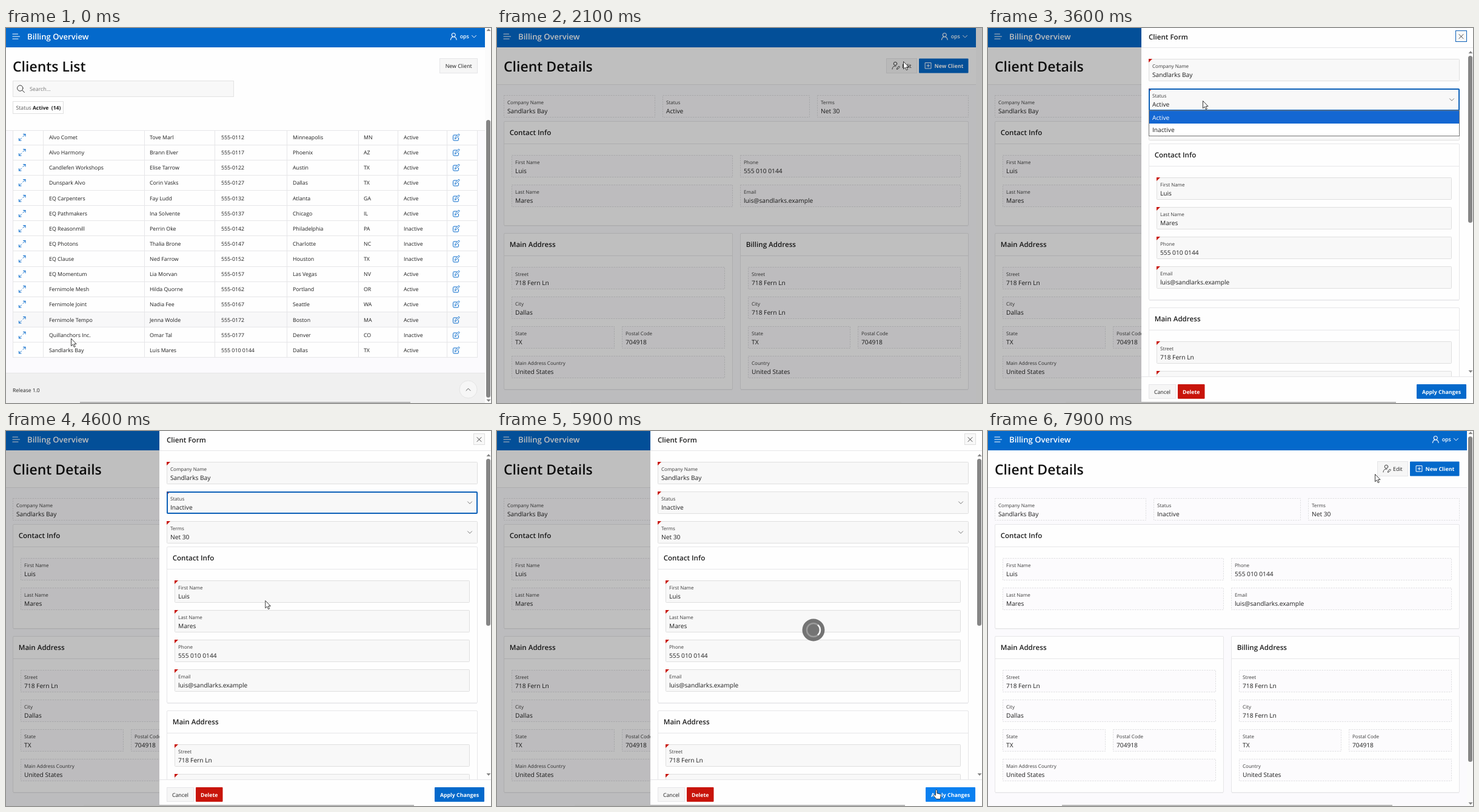
These frames come from a looping animation (800 by 620 pixels, 8 s). An HTML page:

```html
<!DOCTYPE html>
<html lang="en">
<head>
<meta charset="utf-8">
<title>Client editor</title>
<style>
html, body { margin: 0; width: 800px; height: 620px; overflow: hidden; background: #fbfafd; }
svg { display: block; font-family: "Open Sans", "Noto Sans", sans-serif; text-rendering: geometricPrecision; }
text { white-space: pre; }
.icon { fill: none; stroke-linecap: round; stroke-linejoin: round; }
</style>
</head>
<body>
<svg id="stage" width="800" height="620" viewBox="0 0 800 620"></svg>
<script>
const LOOP = 8000, STEP = 100;
const BLUE = '#0469cb', RED = '#c8140a', INK = '#1e1e1e', LINE = '#e6e6e8';

// Drawing helpers
const text = (x, y, s, size = 8.8, o = {}) =>
  `<text x="${x}" y="${y}" font-size="${size}" font-weight="${o.w || 400}" fill="${o.fill || INK}"` +
  `${o.mid ? ' text-anchor="middle"' : ''}${o.id ? ` id="${o.id}"` : ''}>${s}</text>`;
const box = (x, y, w, h, fill, extra = '') =>
  `<rect x="${x}" y="${y}" width="${w}" height="${h}" fill="${fill}" ${extra}/>`;
const frame = (x, y, x2, y2, fill, stroke = LINE, extra = '') =>
  box(x + .5, y + .5, x2 - x - 1, y2 - y - 1, fill, `stroke="${stroke}" ${extra}`);
const hline = (x, x2, y, c = LINE) => box(x, y, x2 - x, 1, c);
const vline = (x, y, y2, c = LINE) => box(x, y, 1, y2 - y, c);
const icon = (d, color, width = 1, extra = '') =>
  `<path class="icon" d="${d}" stroke="${color}" stroke-width="${width}" ${extra}/>`;
const group = (id, body, extra = '') => `<g id="${id}" ${extra}>${body}</g>`;

const firm = 'Sandlarks Bay', first = 'Luis', last = 'Mares';
const phone = '555 010 0144', mail = 'luis@sandlarks.example';
const street = '718 Fern Ln', zip = '704918';

const clients = [
  ['Alvo Comet', 'Tove Marl', 'Minneapolis', 'MN', 1],
  ['Alvo Harmony', 'Brann Elver', 'Phoenix', 'AZ', 1],
  ['Candlefen Workshops', 'Elise Tarrow', 'Austin', 'TX', 1],
  ['Dunspark Alvo', 'Corin Vasks', 'Dallas', 'TX', 1],
  ['EQ Carpenters', 'Fay Ludd', 'Atlanta', 'GA', 1],
  ['EQ Pathmakers', 'Ina Solvente', 'Chicago', 'IL', 1],
  ['EQ Reasonmill', 'Perrin Oke', 'Philadelphia', 'PA', 0],
  ['EQ Photons', 'Thalia Brone', 'Charlotte', 'NC', 0],
  ['EQ Clause', 'Ned Farrow', 'Houston', 'TX', 0],
  ['EQ Momentum', 'Lia Morvan', 'Las Vegas', 'NV', 1],
  ['Fernimole Mesh', 'Hilda Quorne', 'Portland', 'OR', 1],
  ['Fernimole Joint', 'Nadia Fee', 'Seattle', 'WA', 1],
  ['Fernimole Tempo', 'Jenna Wolde', 'Boston', 'MA', 1],
  ['Quillanchors Inc.', 'Omar Tal', 'Denver', 'CO', 0],
  [firm, `${first} ${last}`, 'Dallas', 'TX', 1]
];
const ROW_TOP = 168.4, ROW_H = 25.13;

const expandIcon = y =>
  icon(`M28 ${y - 1.5}l4-4m-3.5 0h3.5v3.500M25.500 ${y + 1}l-4 4m0-3.500v3.500h3.500`, BLUE);
const editIcon = y =>
  icon(`M743.500 ${y - 4}h-4.500q-1.500 0-1.500 1.500v6q0 1.500 1.500 1.500h6q1.500 0 1.500-1.500v-3` +
    `M740.500 ${y + 2}l.600-2.400 4.900-4.900q.900-.700 1.600 0t0 1.600l-4.900 4.900z`, BLUE);

function listPage() {
  let s = box(0, 32, 790, 138, '#fefefe') + hline(0, 790, 169) +
    text(11, 72, 'Clients List', 23, { w: 600, fill: '#111' }) +
    frame(715, 50, 778, 75, '#f6f6f6') + text(746.7, 66.2, 'New Client', 8.8, { mid: 1 }) +
    frame(11, 87, 376, 114, '#f8f8f8', '#e2e2e2') +
    icon('M28 99.500a4.700 4.700 0 1 1-9.400 0a4.700 4.700 0 1 1 9.400 0M26.700 103L30.500 106.500', '#333') +
    text(39, 104.2, 'Search...', 8.8, { fill: '#777' }) +
    frame(11, 121, 95, 142, '#fefefe', '#e0e0e0') +
    text(16.5, 135, 'Status', 8.7, { fill: '#555' }) + text(44, 135, 'Active  (14)', 8.5, { w: 700 }) +
    box(11, 170, 767, 375, '#fefefe') + box(12, 0, 765, ROW_H, '#f8f8f9', 'id="hover"');
  clients.forEach(([name, person, city, state, active], i) => {
    const y = ROW_TOP + i * ROW_H, mid = Math.round(y + 12.6), base = mid + 3.3;
    const cells = [[71, name], [237, person],
      [355, i < 14 ? '555-01' + (12 + i * 5) : phone],
      [473, city], [590, state], [656, active ? 'Active' : 'Inactive']];
    s += cells.map(([x, v]) => text(x, base, v)).join('') +
      expandIcon(mid) + editIcon(mid) + hline(11, 778, Math.round(y + ROW_H) - 1);
  });
  s += [11, 61, 228, 344, 463, 581, 646, 727, 777].map(x => vline(x, 170, 545)).join('');
  return s + box(0, 570, 790, 50, '#f0f0f0') + hline(0, 790, 570, '#e6e6e6') +
    text(11, 601.5, 'Release 1.0', 8.5) +
    '<circle cx="762.5" cy="597.5" r="14.5" fill="#f6f6f6" stroke="#e4e4e4"/>' +
    icon('M759 599.500l3.500-3.500 3.500 3.500', '#555');
}

const fieldText = (x, y, label, value, id) =>
  text(x + 6, y + 14.5, label, 8, { fill: '#3c3c3c' }) + text(x + 6, y + 29.8, value, 10.2, { id });
const readField = (x, x2, y, label, value, id) =>
  frame(x, y, x2, y + 37, '#fcfbfd', '#e0e0e2', 'stroke-dasharray="2.500 1.500"') +
  fieldText(x, y, label, value, id);
const region = (x, x2, y, y2, title) =>
  frame(x, y, x2, y2, '#fefefe', LINE, 'rx="1.500"') + hline(x, x2, y + 37) + hline(x + 1, x2 - 1, y2, '#f0f0f2') +
  text(x + 9.7, y + 23.3, title, 11.6, { w: 600 });

function addressFields(x, x2, mid, city, country) {
  return readField(x, x2, 395, 'Street', street) + readField(x, x2, 444, 'City', city) +
    readField(x, mid, 493, 'State', 'TX') + readField(mid + 12, x2, 493, 'Postal Code', zip) +
    readField(x, x2, 542, country, 'United States');
}

const detailHead = box(0, 32, 790, 61, '#fefefe') + hline(0, 790, 93) +
  text(11, 72, 'Client Details', 23, { w: 600, fill: '#111' });

const detailBody = frame(642, 50, 693, 75, '#f6f6f6') +
  icon('M659.800 59a2.800 2.800 0 1 1-5.600 0a2.800 2.800 0 1 1 5.600 0M652 68c0-4 3-5.500 6-4.800M659.500 68l.5-2 3-3 1.500 1.500-3 3z', '#444') +
  text(668, 66.2, 'Edit') +
  box(696, 50.5, 81.5, 24, BLUE, 'rx="1"') +
  icon('M706.500 57.500h9.500v9.500h-9.500zM711.250 60v4.500M709 62.250h4.500', '#fff') +
  text(721.5, 66.2, 'New Client', 8.8, { w: 700, fill: '#fff' }) +
  readField(11, 261, 111, 'Company Name', firm) +
  readField(273, 516, 111, 'Status', 'Active', 'status') +
  readField(528, 778, 111, 'Terms', 'Net 30') +
  region(11, 778, 154, 327, 'Contact Info') +
  readField(24, 389, 210, 'First Name', first) + readField(401, 765, 210, 'Phone', phone) +
  readField(24, 389, 259, 'Last Name', last) + readField(401, 765, 259, 'Email', mail) +
  region(11, 389, 339, 598, 'Main Address') +
  addressFields(24, 376, 194, 'Dallas', 'Main Address Country') +
  region(401, 778, 339, 598, 'Billing Address') +
  addressFields(414, 765, 583, street, 'Country');

// Drawer
const editField = (x, x2, y, label, value, id) =>
  frame(x, y, x2, y + 37, '#f8f8f8', '#dfdfdf', 'rx="1"') +
  `<path d="M${x} ${y}h6l-6 6z" fill="${RED}"/>` + fieldText(x, y, label, value, id);
const chevron = (x, y, color) => icon(`M${x - 3.500} ${y - 1.700}l3.500 3.500 3.500-3.500`, color);
const arrow = (y, dir) => `<path d="M792.500 ${y + 2 * dir}h7l-3.500 ${-4 * dir}z" fill="#858585"/>`;

const formBody = editField(265, 778, 51, 'Company Name', firm) +
  editField(265, 778, 100, 'Status', 'Active', 'choice') + chevron(765, 118.5, '#777') +
  editField(265, 778, 149, 'Terms', 'Net 30') + chevron(765, 167.500, '#777') +
  region(265, 778, 191, 450, 'Contact Info') +
  [['First Name', first], ['Last Name', last], ['Phone', phone], ['Email', mail]]
    .map(([k, v], i) => editField(278, 765, Math.round(247 + i * 48.9), k, v)).join('') +
  region(265, 778, 462, 720, 'Main Address') +
  editField(278, 765, 518, 'Street', street) + editField(278, 765, 567, 'City', 'Dallas') +
  box(253, 576, 547, 44, '#fefefe') + hline(253, 800, 576) +
  frame(265, 589, 310, 613, '#f6f6f6') + text(287.5, 604.7, 'Cancel', 8.8, { mid: 1 }) +
  box(313, 589, 44.5, 24, RED, 'rx="1"') + text(335.2, 604.7, 'Delete', 8.8, { mid: 1, w: 700, fill: '#fff' }) +
  box(707, 589, 82, 24, BLUE, 'rx="1" id="apply"') +
  text(748, 604.7, 'Apply Changes', 8.8, { mid: 1, w: 700, fill: '#fff' }) +
  box(792, 46, 7, 276, '#858585', 'rx="3.500"') + arrow(40, 1) + arrow(568, -1) +
  group('focus', '<rect x="266" y="101" width="511" height="35" rx="1" fill="none" stroke="#0c60b8" stroke-width="2"/>') +
  group('menu', frame(265, 136, 778, 179, '#fff', '#757575') +
    box(266, 137, 511, 21, '#1467d2', 'id="pick"') +
    text(271, 151.5, 'Active', 10.2, { id: 'optA' }) + text(271, 172.3, 'Inactive', 10.2, { id: 'optB' }));

const drawer = box(253, 0, 547, 620, '#fefefe') + hline(253, 800, 32) +
  text(265, 18.5, 'Client Form', 11.6, { w: 600 }) +
  frame(771, 4, 790, 23, '#f8f8f8', '#dedede', 'id="close"') +
  icon('M777 10.500l7 7m0-7l-7 7', '#444') + group('form', formBody);

document.getElementById('stage').innerHTML =
  box(0, 0, 800, 620, '#fbfafd') +
  group('list', listPage()) + group('head', detailHead) + group('details', detailBody) +
  box(790, 0, 10, 620, '#fbfbfb') + box(0, 0, 790, 32, BLUE) +
  icon('M11 10h8.500M11 14h11.500M11 18h9', '#fff', 1.2) +
  text(35, 18.9, 'Billing Overview', 13.1, { w: 600, fill: '#fff' }) +
  text(748.7, 17.4, 'ops', 8.8, { w: 600, fill: '#fff' }) +
  group('userIcons', icon('M741.300 11.500a3 3 0 1 1-6 0a3 3 0 1 1 6 0M733.500 19.500c.6-6.300 9-6.300 9.600 0', '#fff', 1.1) + chevron(772, 14, '#fff')) +
  group('bar', arrow(3, 1) + arrow(616, -1) + box(792, 9, 7, 538, '#858585', 'rx="3.500" id="thumb"')) +
  box(0, 0, 800, 620, '#000', 'id="dim" fill-opacity=".25"') +
  group('drawer', drawer) +
  box(122, 618, 545, 2, '#b9b9b9', 'id="hbar"') +
  group('spinner', '<circle cx="522" cy="329" r="18.500" fill="#747474"/>' +
    '<circle cx="522" cy="329" r="11" fill="none" stroke="#9b9b9b" stroke-width="2.500"/>' +
    '<path id="arc" d="M513.600 321.900A11 11 0 0 1 530.400 321.900" fill="none" stroke="#fff" stroke-width="2.500"/>') +
  group('arrowCursor', '<path d="M.5.5V12.800L3.300 10.100 5.300 14.600 7.300 13.700 5.300 9.400H9Z" fill="#fff" stroke="#222" stroke-width=".9"/>') +
  group('handCursor', '<path d="M3.500 9.500V1.500C3.500-.2 5.900-.2 5.900 1.500V6L10.800 7.200C11.800 7.500 12.300 8.200 12.200 9.200L11.300 15.500H4.800L.6 10.500C-.2 9.200 1.200 8 2.300 8.800Z" fill="#fff" stroke="#222" stroke-width=".9"/>');

// Pointer path: time, x, y
const path = [
  [0, 107, 513], [200, 84, 528], [400, 42, 544], [600, 24, 531], [1000, 24, 531],
  [1300, 372, 408], [1600, 590, 180], [1800, 668, 64], [1900, 670, 55], [2700, 670, 55],
  [3000, 560, 72], [3300, 372, 117], [3600, 354, 120], [3800, 338, 142], [4000, 322, 160],
  [4400, 322, 160], [4700, 480, 340], [5000, 680, 560], [5200, 720, 593], [6000, 720, 593],
  [6200, 590, 440], [6500, 322, 195], [6800, 282, 155], [7000, 270, 152], [7200, 263, 150],
  [7400, 300, 149], [7600, 430, 122], [7900, 638, 71], [8000, 638, 71]
];
function pointer(t) {
  const i = Math.max(1, path.findIndex(p => p[0] > t));
  const [t0, x0, y0] = path[i - 1], [t1, x1, y1] = path[i];
  const k = (t - t0) / (t1 - t0);
  return [x0 + (x1 - x0) * k, y0 + (y1 - y0) * k];
}

const ui = {};
document.querySelectorAll('[id]').forEach(e => ui[e.id] = e);
const show = (id, on) => ui[id].style.display = on ? '' : 'none';
const set = (id, attrs) => { for (const k in attrs) ui[id].setAttribute(k, attrs[k]); };
const within = (t, a, b) => t >= a && t < b;

function render(t) {
  const onList = t < 1000;
  const loading = within(t, 1000, 1200) || within(t, 6300, 6700);
  const modal = within(t, 2000, 6000);
  const [x, y] = pointer(t);

  show('list', onList);
  show('head', !onList);
  show('details', !onList && !loading);
  show('userIcons', !loading);
  show('bar', !modal);
  set('thumb', onList ? { y: 152, height: 459 } : { y: 9, height: loading ? 569 : 538 });
  show('hbar', onList || within(t, 1900, 6200) || t >= 7000);
  set('hbar', { x: within(t, 2400, 6000) ? 128 : 122 });
  ui.status.textContent = t >= 6300 ? 'Inactive' : 'Active';

  const row = Math.floor((pointer(Math.max(0, t - STEP))[1] - ROW_TOP - (t < 100 ? 20 : 0)) / ROW_H);
  set('hover', { y: ROW_TOP + Math.min(14, row) * ROW_H });

  show('dim', modal);
  show('drawer', within(t, 2200, 6000));
  const slide = Math.min(1, Math.max(0, (t - 2100) / 300));
  set('drawer', { transform: `translate(${547 * (1 - slide) ** 2} 0)` });
  show('form', t >= 2800);
  set('close', { stroke: within(t, 2800, 3700) ? '#0c60b8' : '#dedede' });
  show('focus', within(t, 3400, 5400));
  show('menu', within(t, 3500, 4100));
  const second = t >= 3900;
  set('pick', { y: second ? 158 : 137, height: second ? 20 : 21 });
  set('optA', { fill: second ? INK : '#fff' });
  set('optB', { fill: second ? '#fff' : INK });
  ui.choice.textContent = t >= 4100 ? 'Inactive' : 'Active';
  set('apply', { fill: t >= 5300 ? '#0a80f0' : BLUE });
  show('spinner', within(t, 5600, 6000));
  set('arc', { transform: `rotate(${(t - 5700) * .45} 522 329)` });

  const hand = within(t, 500, 1000) || within(t, 5200, 6000);
  show('handCursor', hand);
  show('arrowCursor', !hand);
  set(hand ? 'handCursor' : 'arrowCursor', { transform: `translate(${x} ${y})` });
}

const start = performance.now();
function tick() {
  const t = (performance.now() - start) % LOOP;
  render(Math.floor(t / STEP) * STEP);
  requestAnimationFrame(tick);
}
tick();
</script>
</body>
</html>
```
